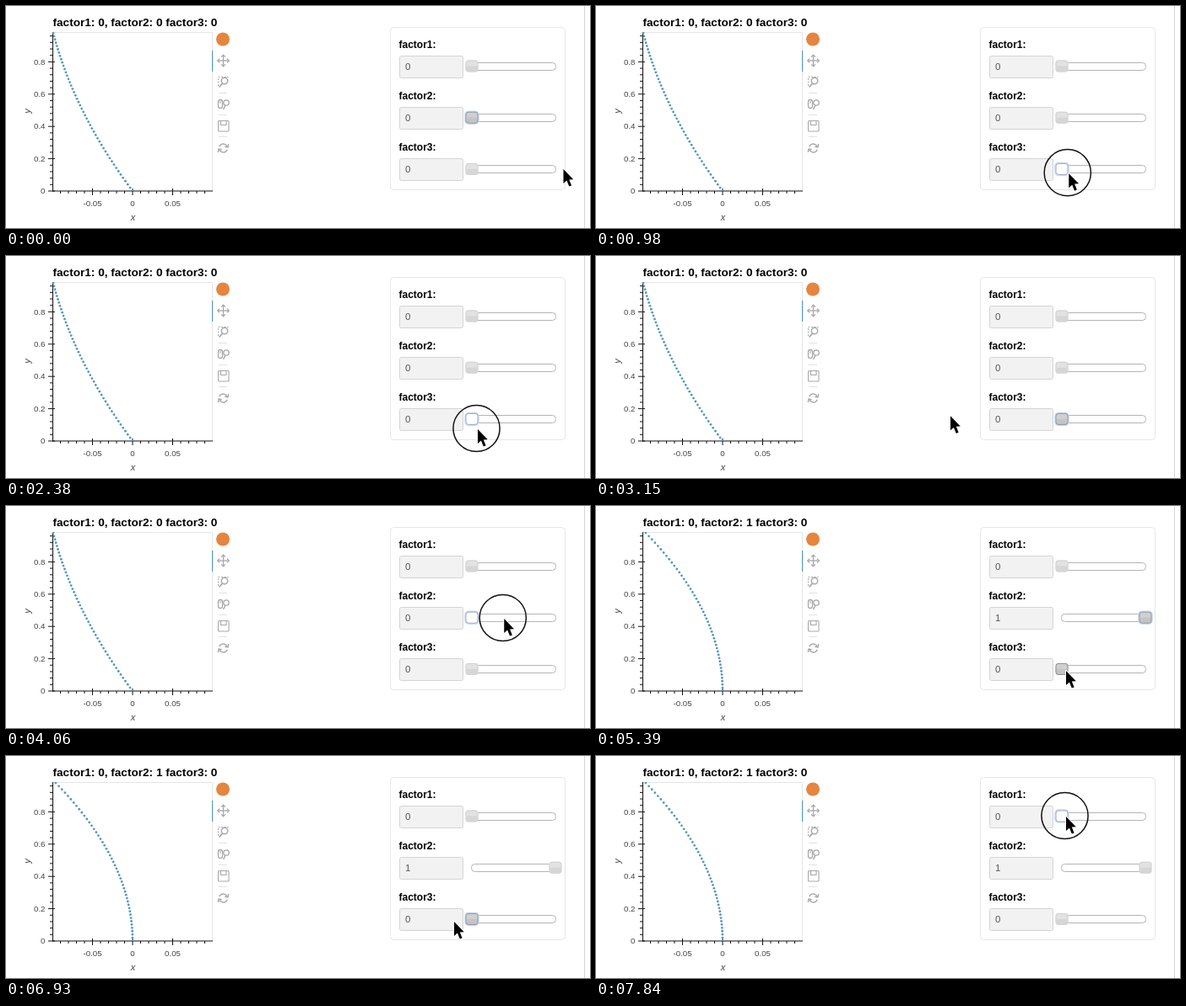
An HTML page with a canvas that plays this animation: 692 by 264 pixels, repeating every 8 s.

```html
<!DOCTYPE html>
<html lang="en">
<head>
<meta charset="utf-8">
<title>Factor sliders</title>
<style>
html, body { margin: 0; width: 692px; height: 264px; overflow: hidden; background: #fff; }
canvas { display: block; }
</style>
</head>
<body>
<canvas id="stage" width="692" height="264"></canvas>
<script>
const ctx = document.getElementById('stage').getContext('2d');
const LOOP = 8000, STEP = 70, LAST = 7840;
const FONT = '"Liberation Sans", Arial, sans-serif';
const TRACK = 552, SPAN = 99, MAX = [1, 1, 4];
const rowY = i => 71.5 + 61.2 * i;

// Pointer moves: from, to, end x, end y
const HOME = { x: 660.5, y: 193 };
const MOVES = [
  [70, 770, 557, 198],
  [910, 1640, 684, 204],
  [1820, 2380, 559, 205],
  [2380, 2660, 533, 209],
  [2660, 2870, 371, 209],
  [2940, 3570, 560, 133],
  [3780, 4500, 650, 133],
  [4830, 5390, 557, 195],
  [5600, 6090, 676, 204],
  [6090, 6900, 531, 196],
  [7000, 7700, 557, 71]
];
// Button held: from, to, slider
const HOLDS = [[980, 2730, 2], [3850, 4690, 1], [5670, 6930, 2], [7770, LOOP, 0]];

const clamp = (v, a, b) => Math.max(a, Math.min(b, v));

function pointer(t) {
  let { x, y } = HOME;
  for (const [from, to, endX, endY] of MOVES) {
    const u = clamp((t - from) / (to - from), 0, 1), e = u * u * (3 - 2 * u);
    x += (endX - x) * e;
    y += (endY - y) * e;
  }
  return { x, y };
}

function stateAt(t) {
  const p = pointer(t), values = [0, 0, 0];
  const part = clamp((p.x - TRACK) / SPAN, 0, 1);
  let held = -1, focus = 1;
  for (const [from, to, i] of HOLDS) {
    if (t < from) break;
    focus = i;
    if (t < to) held = i;
  }
  if (t >= HOLDS[1][1]) values[1] = 1;
  if (held >= 0) values[held] = Math.round(part * MAX[held]);
  return { p, held, focus, values };
}

function line(color, width, ...pts) {
  ctx.strokeStyle = color;
  ctx.lineWidth = width;
  ctx.beginPath();
  for (let i = 0; i < pts.length; i += 2) ctx.lineTo(pts[i], pts[i + 1]);
  ctx.stroke();
}

function box(x, y, w, h, r, fill, stroke, width = 1) {
  ctx.beginPath();
  ctx.roundRect(x, y, w, h, r);
  if (fill) { ctx.fillStyle = fill; ctx.fill(); }
  if (stroke) { ctx.strokeStyle = stroke; ctx.lineWidth = width; ctx.stroke(); }
}

function ring(x, y, r, color, width, from = 0, to = 2 * Math.PI) {
  ctx.strokeStyle = color;
  ctx.lineWidth = width;
  ctx.beginPath();
  ctx.arc(x, y, r, from, to);
  ctx.stroke();
}

function dot(x, y, r, color) {
  ctx.fillStyle = color;
  ctx.beginPath();
  ctx.arc(x, y, r, 0, 2 * Math.PI);
  ctx.fill();
}

function text(str, x, y, style, color, align = 'left') {
  ctx.font = style + ' ' + FONT;
  ctx.fillStyle = color;
  ctx.textAlign = align;
  ctx.fillText(str, x, y);
}

// Runs paint with the origin moved and turned
function at(x, y, angle, paint) {
  ctx.save();
  ctx.translate(x, y);
  ctx.rotate(angle);
  paint();
  ctx.restore();
}

const px = v => 150 + v * 950;
const py = v => 220 - v * 192;

function axes() {
  const small = '9.7px', ink = '#444';
  line('#e5e5e5', 1, 55.5, 31.5, 244.5, 31.5, 244.5, 220);
  line('#111', 1, 55.5, 31, 55.5, 220.5);
  line('#111', 1, 55, 220, 245, 220);
  for (let i = 0; i <= 24; i++) {
    const y = py(i * 0.04), major = i % 5 === 0;
    line('#111', 1, major ? 50 : 52, y, major ? 58 : 55, y);
    if (major) text(i ? (i * 0.04).toFixed(1) : '0', 46.5, y + 3.2, small, ink, 'right');
  }
  for (let i = -9; i <= 9; i++) {
    const x = px(i * 0.01), major = i % 5 === 0;
    line('#111', 1, x, major ? 217 : 220, x, major ? 225 : 223);
    if (major) text(i ? (i * 0.01).toFixed(2) : '0', x, 238.3, small, ink, 'center');
  }
  text('x', 150.5, 255, 'italic 11px', ink, 'center');
  at(29, 125, -Math.PI / 2, () => text('y', 0, 0, 'italic 11px', ink, 'center'));
}

function curve([, f2, f3]) {
  const b = 1.5 * (1 - f2) + f3 / 8;
  ctx.save();
  ctx.beginPath();
  ctx.rect(54, 31, 191, 189);
  ctx.clip();
  for (let i = 0; i < 50; i++) {
    const y = i / 49;
    dot(px(-0.1 * (b * y + (1 - b) * y * y)), py(y), 1.4, '#5499b9');
  }
  ctx.restore();
}

function toolbar() {
  const c = '#a8a8a8', x = 257.5;
  dot(257, 39.5, 8, '#e5853f');
  line('#5499b9', 1.2, 244.6, 53, 244.6, 78);
  for (let i = 0; i < 3; i++) line('#e2e2e2', 1, 252, 103.5 + 26 * i, 262, 103.5 + 26 * i);

  // pan
  for (let i = 0; i < 4; i++) {
    at(x, 65, i * Math.PI / 2, () => {
      line(c, 1.3, 0, 0, 0, -6);
      line(c, 1.3, -2.4, -4.4, 0, -6.8, 2.4, -4.4);
    });
  }
  // box zoom
  ctx.setLineDash([2, 1.5]);
  line(c, 1, 254, 96, 251.5, 96, 251.5, 84.5, 263.5, 84.5);
  ctx.setLineDash([]);
  ring(259, 89, 3.7, c, 1.5);
  line(c, 1.8, 256.5, 92, 253, 96);
  // wheel zoom
  box(251.5, 111.5, 5, 10, 2.5, null, c, 1.3);
  line(c, 1, 254, 113, 254, 116);
  ring(261, 115, 3.2, c, 1.3);
  line(c, 1.5, 260, 118, 257.5, 123);
  // save
  box(251.5, 136.5, 12.5, 12.5, 1, null, c, 1.1);
  line(c, 1.1, 254.5, 137, 254.5, 141.5, 261, 141.5, 261, 137);
  // reset
  for (let i = 0; i < 2; i++) {
    at(x, 169, i * Math.PI, () => {
      ring(0, 0, 5, c, 1.4, -2.8, -0.35);
      line(c, 1.4, 6.2, -5, 5.5, -1, 1.8, -1.8);
    });
  }
}

function thumb(x, y, held, focus, hover) {
  const l = x - 7.5, t = y - 7, lit = focus || hover;
  if (focus) box(l - 0.5, t - 0.5, 16, 15, 4, null, '#c9daf2', 1.5);
  if (held) return box(l + 0.5, t + 0.5, 14, 13, 3, '#fff', '#9aabc2');
  box(l, t, 15, 14, 3, lit ? '#d0d0d0' : '#e2e2e2');
  ctx.fillStyle = lit ? '#c4c4c4' : '#d6d6d6';
  ctx.fillRect(l + 1, y, 13, 6);
  box(l + 0.5, t + 0.5, 14, 13, 3, null, focus ? '#8b98b3' : hover ? '#8e8e8e' : '#d2d2d2');
}

function sliders({ p, held, focus, values }) {
  box(455.5, 25.5, 207, 193, 4, '#fff', '#e6e6e6');
  values.forEach((v, i) => {
    const y = rowY(i), x = TRACK + SPAN * v / MAX[i];
    const hover = held < 0 && Math.abs(p.x - x) < 9 && Math.abs(p.y - y) < 7.5;
    text(`factor${i + 1}:`, 465.5, y - 22, 'bold 12px', '#000');
    box(466.5, Math.round(y - 13) + 0.5, 75, 26, 2, '#f2f2f2', '#d4d4d4');
    text(v, 473, y + 4.3, '11.5px', '#555');
    box(551.5, Math.round(y - 5) + 0.5, 100, 9, 4, '#fff', '#b4b4b4');
    thumb(x, y, held === i, focus === i, hover);
  });
}

function arrow({ x, y }) {
  const shape = new Path2D('M0 0V17L3.9 13.6L6.8 20.6L9.6 19.4L6.8 12.4L11.8 12.2Z');
  at(x, y + 1, 0, () => {
    ctx.lineJoin = 'round';
    ctx.strokeStyle = '#fff';
    ctx.lineWidth = 2;
    ctx.stroke(shape);
    ctx.fillStyle = '#000';
    ctx.fill(shape);
  });
}

function draw(t) {
  const s = stateAt(t), [a, b, c] = s.values;
  ctx.fillStyle = '#fff';
  ctx.fillRect(0, 0, 692, 264);
  line('#d4d4d4', 1, 685.5, 0, 685.5, 264);
  axes();
  curve(s.values);
  text(`factor1: ${a}, factor2: ${b} factor3: ${c}`, 55.5, 23.6, 'bold 13.6px', '#000');
  toolbar();
  sliders(s);
  if (s.held >= 0) ring(s.p.x - 1.5, s.p.y, 27.6, '#111', 1.5);
  arrow(s.p);
}

const start = performance.now();
function tick() {
  const t = (performance.now() - start) % LOOP;
  draw(Math.min(Math.floor(t / STEP) * STEP, LAST));
  requestAnimationFrame(tick);
}
tick();
</script>
</body>
</html>
```
